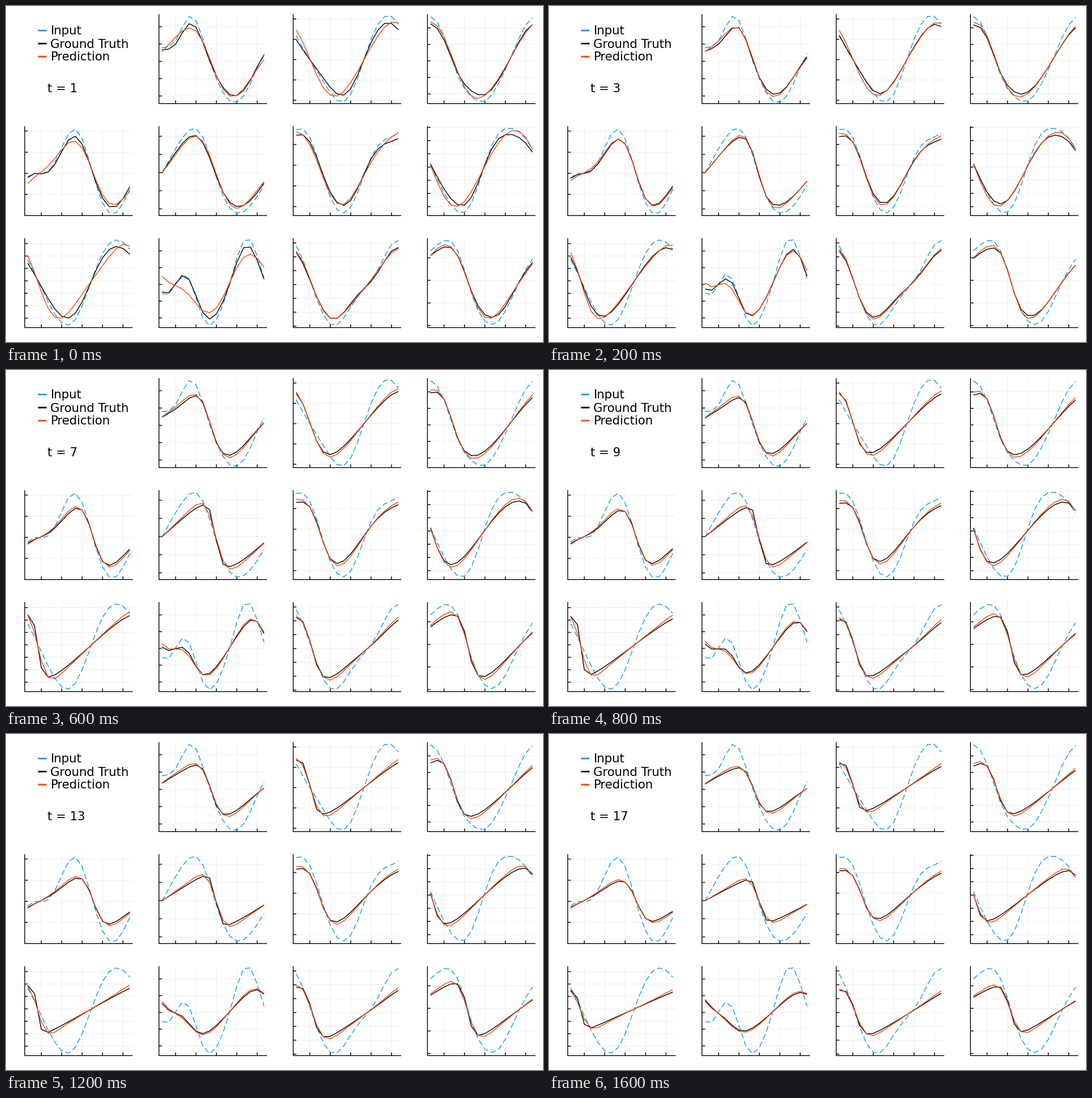
Animation of 947 by 592 pixels, one loop 2100 ms. Source, as a matplotlib script:

```python
import numpy as np
import matplotlib.pyplot as plt
from matplotlib.animation import FuncAnimation

W, H, DPI = 947, 592, 64
PX = 72 / DPI                      # points per pixel
BLUE, BLACK, ORANGE, GRID = "#009afa", "#000000", "#ff4500", "#eeeeee"
PANEL_W, PANEL_H, TICK = 190.5, 157.5, 5.5
STEP, CELLS, FINE = 12, 16, 8      # px per cell, samples, grid points per cell
LAST = 17
SPEED, VISCOSITY, DT = 0.10, 0.13, 0.02

# row, column, y of the zero level, px per tick, units per tick,
# and the wave's height at every second sample.
PANELS = [
    (0, 1, 97.0, 30.5, 1, (24, 36, 79, 40, -31, -70, -61, -11)),
    (0, 2, 94.0, 35.8, 2, (42, 0, -39, -72, -61, 2, 62, 76)),
    (0, 3, 96.2, 29.1, 1, (78, 44, -25, -63, -71, -40, 12, 63)),
    (1, 0, 294.3, 37.2, 1, (-8, -1, 19, 70, 61, -18, -70, -53)),
    (1, 1, 293.0, 32.0, 2, (-1, 42, 75, 63, -8, -63, -69, -42)),
    (1, 2, 280.0, 36.5, 1, (63, 49, -22, -78, -74, -17, 34, 50)),
    (1, 3, 283.2, 23.3, 1, (6, -46, -79, -64, 5, 59, 68, 50)),
    (2, 0, 483.8, 21.9, 2, (37, -12, -59, -78, -44, 21, 66, 68)),
    (2, 1, 490.0, 29.5, 1, (-16, 1, 10, -59, -62, 3, 77, 50)),
    (2, 2, 490.2, 24.4, 1, (68, 10, -54, -71, -40, -8, 26, 70)),
    (2, 3, 482.9, 39.8, 2, (52, 70, 52, -22, -72, -72, -30, 19)),
]


def periodic_fill(keys, n):
    """Trigonometric interpolation of evenly spaced key heights."""
    spec = np.fft.rfft(keys, axis=1)
    spec[:, -1] *= 0.5
    return np.fft.irfft(spec, n, axis=1) * n / keys.shape[1]


def burgers(u, speed, steps):
    """Viscous Burgers flow on a ring, sampled once per cell at each step."""
    dx = 1 / FINE
    history = [u[:, ::FINE]]
    for _ in range(steps):
        right, left = np.roll(u, -1, 1), np.roll(u, 1, 1)
        advect = speed * (right**2 - left**2) / (4 * dx)
        diffuse = VISCOSITY * (right - 2 * u + left) / dx**2
        u = u + DT * (diffuse - advect)
        history.append(u[:, ::FINE])
    return history


keys = np.array([p[5] for p in PANELS], float)
speed = np.array([[SPEED * p[4] / p[3]] for p in PANELS])
start = periodic_fill(keys, CELLS * FINE)
flow = burgers(0.84 * start, speed, int(LAST / DT))


def truth(t):
    return flow[round((t - 1) / DT)]


def prediction(t):
    """Low-passed flow that begins ahead of time and settles onto the truth."""
    early = np.exp(-(t - 1) / 2)
    n = np.arange(CELLS // 2 + 1)
    gain = (1.08 + 0.07 * early) * np.exp(-(n - 1) ** 2 / (10 - 8 * early))
    gain[0] = 1
    spec = np.fft.rfft(truth(t + 4 * early), axis=1)
    return np.fft.irfft(spec * gain, CELLS, axis=1)


fig = plt.figure(figsize=(W / DPI, H / DPI), dpi=DPI, facecolor="white")
ax = fig.add_axes([0, 0, 1, 1])
ax.set_xlim(-0.5, W - 0.5)
ax.set_ylim(H - 0.5, -0.5)
ax.axis("off")


def stroke(x, y, color, width=1.4, **kw):
    kw.setdefault("solid_capstyle", "butt")
    return ax.plot(x, y, color=color, lw=width * PX, snap=False, **kw)[0]


def draw_panel(row, col, zero, gap, wave):
    x0, y0 = 32.5 + W / 4 * col, 171.4 + H / 3 * row
    x1, top = x0 + PANEL_W, y0 - PANEL_H
    xs = x0 + 5.3 + STEP * np.arange(CELLS)
    x_ticks = xs[2::3]
    y_ticks = [y for y in zero + gap * np.arange(-4, 5) if top < y < y0 - 1.5]

    for x in x_ticks:
        stroke([x, x], [top, y0], GRID, 1, zorder=1)
        stroke([x, x], [y0, y0 - TICK], BLACK)
    for y in y_ticks:
        stroke([x0, x1], [y, y], GRID, 1, zorder=1)
        stroke([x0, x0 + TICK], [y, y], BLACK)
    stroke([x0, x0, x1], [top, y0, y0], BLACK)

    stroke(xs, zero - wave, BLUE, ls=(0, (7, 3.6)), dash_capstyle="butt", zorder=3)
    return [stroke(xs, zero - wave, c, zorder=4) for c in (BLACK, ORANGE)]


def label(x, baseline, text):
    return ax.text(x, baseline, text, family="DejaVu Sans", size=21.3 * PX,
                   color=BLACK, ha="left", va="baseline")


lines = [draw_panel(*p[:4], wave) for p, wave in zip(PANELS, start[:, ::FINE])]

for i, (name, color) in enumerate(
        (("Input", BLUE), ("Ground Truth", BLACK), ("Prediction", ORANGE))):
    stroke([56, 71], [42.7 + 23 * i] * 2, color, 2.8)
    label(78, 50 + 23 * i, name)
clock = label(72.5, 152, "t = 1")


def update(frame):
    t = min(frame + 1, LAST)
    for pair, panel, *waves in zip(lines, PANELS, truth(t), prediction(t)):
        for line, wave in zip(pair, waves):
            line.set_ydata(panel[2] - wave)
    clock.set_text(f"t = {t}")
    return [line for pair in lines for line in pair] + [clock]


anim = FuncAnimation(fig, update, frames=21, interval=100, repeat=True,
                     repeat_delay=0, init_func=lambda: update(0), blit=False)
plt.show()
```
